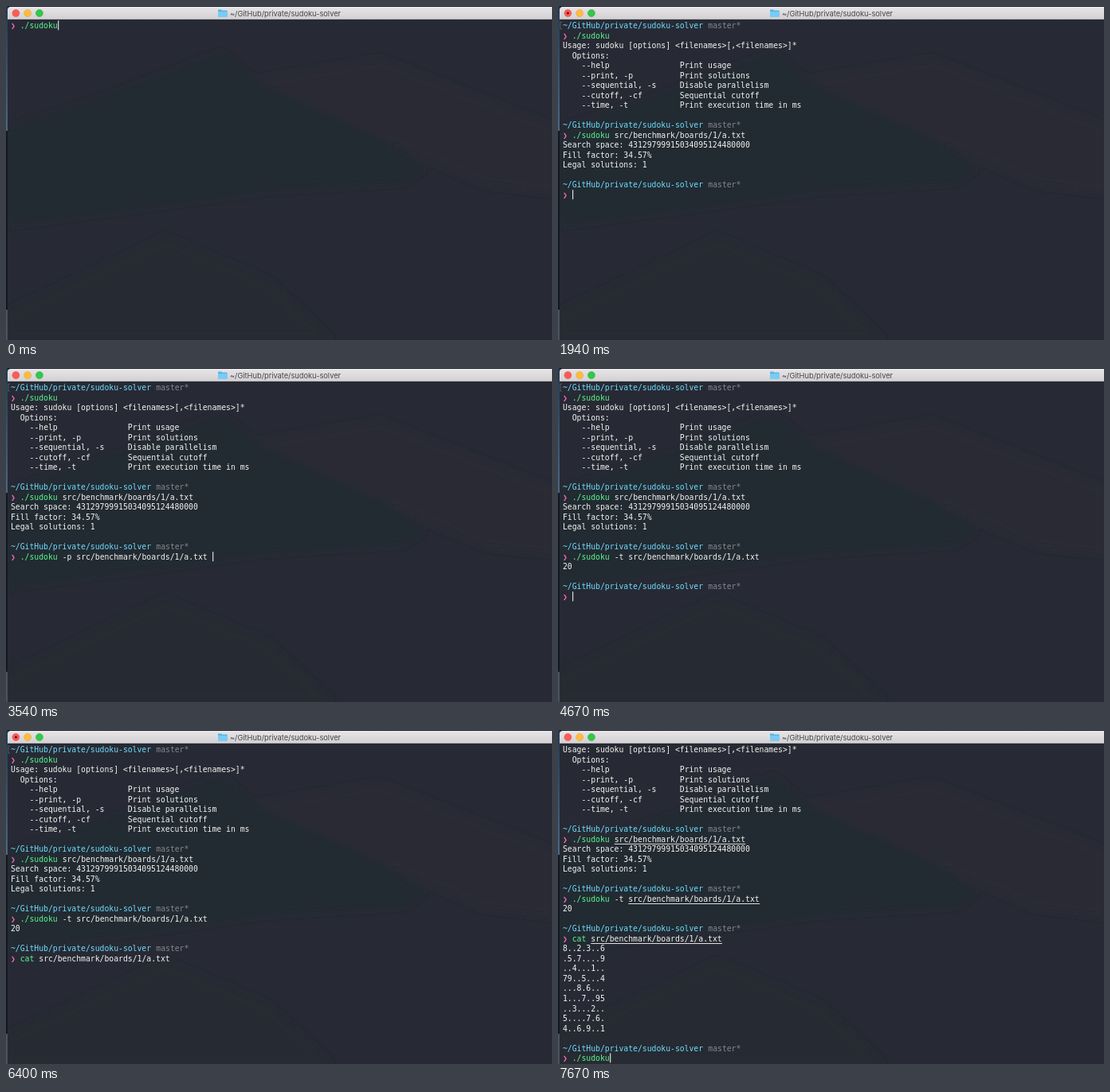
These frames come from a looping animation (685x420 px, 8000 ms). An HTML page:

```html
<!DOCTYPE html>
<html lang="en">
<head>
<meta charset="utf-8">
<title>Terminal session</title>
<style>
  html, body { margin: 0; width: 100%; height: 100%; overflow: hidden; background: #272a34; }
  svg { display: block; width: 685px; height: 420px; }
  text { white-space: pre; }
  .mono { font: 9.767px "DejaVu Sans Mono", "Liberation Mono", monospace; }
  .title { font: 9.25px Inter, Roboto, sans-serif; fill: #454346; }
</style>
</head>
<body>
<svg viewBox="0 0 685 420" xmlns="http://www.w3.org/2000/svg">
  <defs>
    <linearGradient id="bar" x1="0" y1="0" x2="0" y2="1">
      <stop offset="0" stop-color="#e7e5e7"/>
      <stop offset="1" stop-color="#d2d0d2"/>
    </linearGradient>
    <linearGradient id="sky" x1="0" y1="0" x2="0" y2="1">
      <stop offset="0" stop-color="#243c55"/>
      <stop offset="1" stop-color="#4a6884"/>
    </linearGradient>
    <filter id="soft" x="-10%" y="-10%" width="120%" height="120%"><feGaussianBlur stdDeviation="5"/></filter>
    <clipPath id="pane"><rect x="2" y="17" width="683" height="403"/></clipPath>
  </defs>

  <!-- desktop behind the window -->
  <rect width="685" height="420" fill="#141824"/>
  <rect width="2" height="157" fill="url(#sky)"/>
  <rect y="382" width="2" height="38" fill="#4b5260"/>

  <!-- translucent pane -->
  <g clip-path="url(#pane)">
    <rect x="2" y="17" width="683" height="403" fill="#272a34"/>
    <g filter="url(#soft)">
      <path d="M0 155L130 112L270 58L315 95L430 135L525 205L500 222L330 232L200 250L0 276Z" fill="#242932"/>
      <path d="M310 93L470 66L685 150V235L600 225L520 190Z" fill="#292b35"/>
      <path d="M200 290L330 345L410 420H0V385Z" fill="#252932"/>
    </g>
  </g>

  <!-- title bar -->
  <path d="M2 17V5Q2 1 6 1H685V17Z" fill="url(#bar)"/>
  <rect x="2" y="16.3" width="683" height=".7" fill="#a9a7aa"/>
  <circle cx="12.4" cy="9" r="4.5" fill="#fc5b57" stroke="#df4744" stroke-width=".5"/>
  <circle cx="27.1" cy="9" r="4.5" fill="#fdbc40" stroke="#dd9f32" stroke-width=".5"/>
  <circle cx="41.9" cy="9" r="4.5" fill="#34c749" stroke="#29a935" stroke-width=".5"/>
  <circle id="busy" cx="12.4" cy="9" r="1.6" fill="#6b0d0a"/>
  <path d="M266 5.2Q266 4.5 266.7 4.5H270L271 5.5H277Q277.6 5.5 277.6 6.2V13Q277.6 13.6 277 13.6H266.7Q266 13.6 266 13Z" fill="#59b5e6"/>
  <path d="M266 7H277.6V13Q277.6 13.6 277 13.6H266.7Q266 13.6 266 13Z" fill="#77cbf6"/>
  <text class="title" x="281" y="12.5">~/GitHub/private/sudoku-solver</text>

  <path id="mark" d="M5 20H3V29H5" fill="none" stroke="#63666f" stroke-width=".8"/>
  <g id="screen" class="mono"></g>
</svg>

<script>
const LOOP = 8000, LEFT = 6, TOP = 28, CELL = 5.88, LINE = 12.52, ROWS = 32;
const WHITE = '#f4f4f1', GREEN = '#5af78e', CYAN = '#6fdcfb', PINK = '#ff6ac1', GRAY = '#85878d', RED = '#ff5c57';

const file = 'src/benchmark/boards/1/a.txt';
const plain = './sudoku ' + file;
const timed = `./sudoku -t ${file} `;
const printed = `./sudoku -p ${file} `;

const usage = [
  'Usage: sudoku [options] <filenames>[,<filenames>]*',
  '  Options:',
  ...[['--help', 'Print usage'],
    ['--print, -p', 'Print solutions'],
    ['--sequential, -s', 'Disable parallelism'],
    ['--cutoff, -cf', 'Sequential cutoff'],
    ['--time, -t', 'Print execution time in ms']]
    .map(([flag, help]) => '    ' + flag.padEnd(21) + help)
];
const stats = ['Search space: 43129799915034095124480000', 'Fill factor: 34.57%', 'Legal solutions: 1'];
const board = ['8..2.3..6', '.5.7....9', '..4...1..', '79..5...4', '...8.6...',
  '1...7..95', '..3...2..', '5....7.6.', '4..6.9..1'];

// start: prompt shown, branch: git status arrives, enter: command sent, print: output shown
const session = [
  { start: 0, branch: 0, keys: [[0, './sudoku']], enter: 70, print: 400, output: usage },
  { start: 470, branch: 600,
    keys: [[800, '.'], [870, './'], [1000, './s'], [1140, './su'], [1340, plain]],
    enter: 1540, print: 1670, output: stats },
  { start: 1740, branch: 1870,
    keys: [[2540, '.'], [2600, './'], [2740, './s'], [2800, './su'], [2940, plain],
      [3140, timed], [3540, printed], [3870, timed]],
    enter: 4340, print: 4470, output: ['20'] },
  { start: 4540, branch: 4600,
    keys: [[4870, 'c'], [4940, 'ca'], [5000, 'cat'], [5140, 'cat '], [5340, 'cat s'], [5540, 'cat src/'],
      [5670, 'cat src/b'], [5870, 'cat src/benchmark/'], [6000, 'cat src/benchmark/boards/'], [6140, 'cat ' + file]],
    enter: 6340, print: 6470, output: board },
  { start: 6540, branch: 6670,
    keys: [[6940, 'cat ' + file], [7140, timed], [7340, plain], [7540, './sudoku']],
    enter: Infinity, print: Infinity, output: [] }
];
const busyTimes = [[340, 540], [1600, 2000], [4400, 4600], [6400, 6600]];
const cursorOff = [[2340, 2540]];

const $ = id => document.getElementById(id);
const during = (spans, t) => spans.some(([a, b]) => t >= a && t < b);
const escape = s => s.replace(/&/g, '&amp;').replace(/</g, '&lt;');
const column = n => (LEFT + n * CELL).toFixed(2);

function commandParts(cmd) {
  const [word] = cmd.split(' ');
  const color = ['./sudoku', 'cat'].includes(word) ? GREEN : /^ca?$/.test(word) ? RED : WHITE;
  return [[0, '❯', PINK], [2, word, color], [2 + word.length, cmd.slice(word.length), WHITE]];
}

function layout(t) {
  const rows = [];
  let cursor = null;
  for (const step of session) {
    if (t < step.start) break;
    const path = [[0, '~/GitHub/private/sudoku-solver', CYAN]];
    if (t >= step.branch) path.push([31, 'master*', GRAY]);
    const cmd = step.keys.reduce((last, [at, text]) => t >= at ? text : last, '');
    const command = commandParts(cmd);
    command.sent = t >= step.enter;
    rows.push(path, command);
    cursor = command.sent ? null : { row: rows.length - 1, col: 2 + cmd.length };
    if (t >= step.print) rows.push(...step.output.map(line => [[0, line, WHITE]]), []);
  }
  const scroll = t < 400 ? 1 : Math.max(0, rows.length - ROWS);
  return { rows, cursor, scroll };
}

function draw(t) {
  const { rows, cursor, scroll } = layout(t);
  const baseline = row => TOP + (row - scroll) * LINE;
  let out = '';
  rows.forEach((parts, row) => {
    if (row < scroll) return;
    const y = baseline(row);
    for (const [col, text, color] of parts) {
      if (!text.trim()) continue;
      const indent = text.search(/\S/);
      out += `<text x="${column(col + indent)}" y="${y.toFixed(2)}" fill="${color}">${escape(text.trim())}</text>`;
    }
    // paths of sent commands get underlined once the view has scrolled
    if (parts.sent && scroll > 1) {
      const [, [, word], [, rest]] = parts;
      const from = 2 + word.length + rest.indexOf('src');
      if (rest) out += `<rect x="${column(from)}" y="${(y + 2.2).toFixed(2)}" width="${file.length * CELL}" height=".9" fill="${WHITE}"/>`;
    }
  });
  if (cursor && !during(cursorOff, t)) {
    out += `<rect x="${column(cursor.col + .04)}" y="${(baseline(cursor.row) - 9.7).toFixed(2)}" width="1.2" height="12" fill="#dcdcdc"/>`;
  }
  if (out !== draw.last) $('screen').innerHTML = draw.last = out;
  $('busy').style.display = during(busyTimes, t) ? '' : 'none';
  $('mark').style.display = scroll ? 'none' : '';
}

const began = performance.now();
function tick() {
  // a few ms of lead keeps hard changes on time
  draw((performance.now() - began + 4) % LOOP);
  requestAnimationFrame(tick);
}
tick();
</script>
</body>
</html>
```
